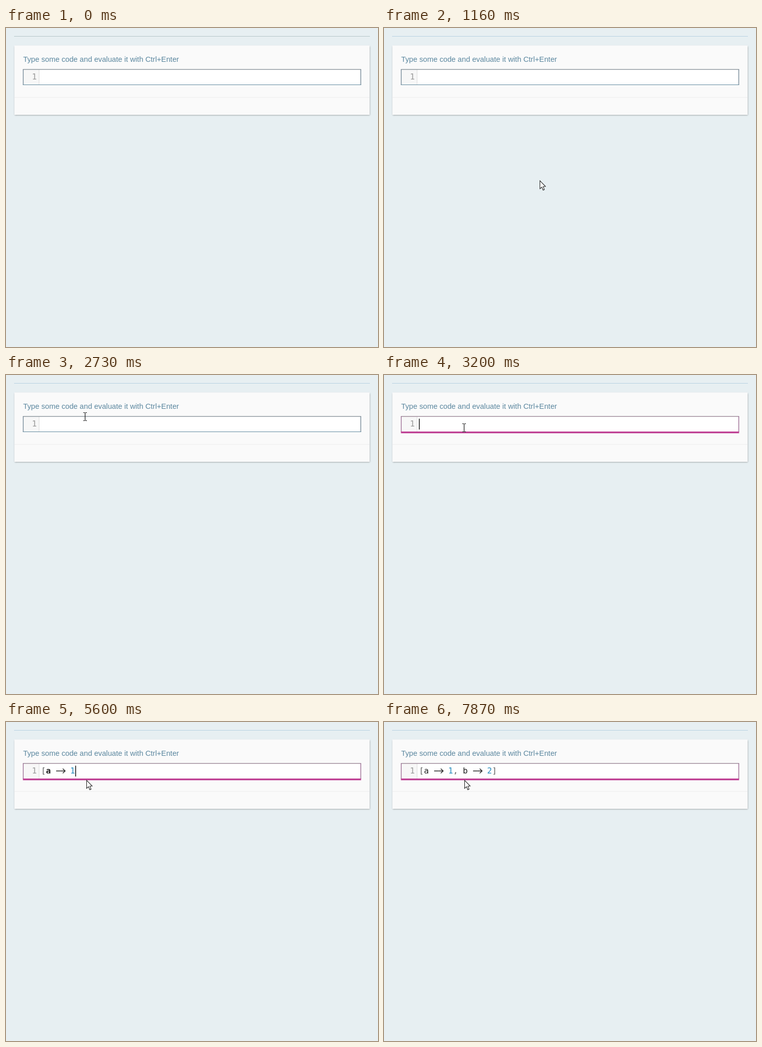
These frames come from a looping animation (736x632 px, 8 s). An HTML page with a canvas:

```html
<!DOCTYPE html>
<html lang="en">
<head>
<meta charset="utf-8">
<title>Code cell</title>
<style>
html, body { margin: 0; width: 100%; height: 100%; overflow: hidden; background: #e7eff2; }
canvas { display: block; width: 736px; height: 632px; }
</style>
</head>
<body>
<canvas id="stage" width="736" height="632"></canvas>
<script>
const ctx = document.getElementById('stage').getContext('2d');
const LOOP = 8000, FOCUS = 3140, BLINK = 530;
const MONO = '16px "DejaVu Sans Mono", monospace';
const X0 = 69.3, STEP = 9.63, BASE = 102;

// Typing comes in short bursts; longer bursts have slower keys.
const bursts = {
  4370: '[', 4800: 'a -', 5300: '> ', 5600: '1, ',
  6070: 'b', 6240: ' -', 6540: '> ', 6800: '2', 7240: ']'
};
const keys = Object.entries(bursts).flatMap(([start, str]) =>
  [...str].map((ch, i) => ({ ch, at: +start + i * 62 * (str.length - 1) })));

const linear = k => k;
const easeOut = k => 1 - (1 - k) ** 3;

// Each pointer move follows a quadratic curve from a over bend to b, then rests.
const moves = [
  { start: 860, end: 1600, hide: 1600, a: [336, 12], bend: [390, 408], b: [12, 608], ease: linear },
  { start: 1870, end: 2070, hide: 2070, a: [118, 128], bend: [128, 70], b: [142, 32], ease: linear },
  { start: 2630, end: 2900, hide: 3400, a: [150, 14], bend: [153.75, 59], b: [157.5, 104], ease: easeOut },
  { start: 3400, end: 3500, hide: LOOP, a: [157.5, 104], bend: [158, 110], b: [159, 115], ease: linear }
];

const clamp = v => Math.max(0, Math.min(1, v));
const mix = (a, b, k) => a + (b - a) * k;
const blend = (a, b, k) => `rgb(${a.map((v, i) => Math.round(mix(v, b[i], k)))})`;

function rect(x, y, w, h, color) {
  ctx.fillStyle = color;
  ctx.fillRect(x, y, w, h);
}

function text(str, x, y, font, color) {
  ctx.font = font;
  ctx.fillStyle = color;
  ctx.fillText(str, x, y);
}

function line(points, color, width) {
  ctx.beginPath();
  points.forEach(([x, y]) => ctx.lineTo(x, y));
  ctx.strokeStyle = color;
  ctx.lineWidth = width;
  ctx.stroke();
}

function drawPanel(t) {
  rect(0, 0, 736, 632, '#e7eff2');
  rect(16, 16, 704, 1, blend([180, 198, 200], [184, 209, 226], clamp((t - 30) / 800)));
  ctx.save();
  ctx.shadowColor = 'rgba(0,0,0,.42)';
  ctx.shadowBlur = 3;
  ctx.shadowOffsetY = 1;
  rect(16.5, 34.5, 703, 137.5, '#fafafa');
  ctx.restore();
  rect(17, 137, 702, 1, '#ededee');
  text('Type some code and evaluate it with Ctrl+Enter', 34, 67,
    '14.7px "Liberation Sans", Arial, sans-serif', '#5b879f');
}

function drawEditor(t) {
  const k = clamp((t - FOCUS) / 60);
  const side = blend([95, 118, 135], [140, 85, 130], k);
  rect(34, 82, 668, 31, '#fff');
  rect(35, 82, 30, 31, '#f7f7f7');
  rect(65, 82, 1, 31, '#ddd');
  rect(33.5, 81.5, 669, 1.2, blend([120, 132, 140], [138, 115, 133], k));
  rect(33.5, 82, 1.2, 31, side);
  rect(701.3, 82, 1.2, 31, side);
  rect(33.5, 112, 669, mix(1, 3.4, k), blend([95, 137, 158], [190, 62, 147], k));
  text('1', 51.3, BASE, MONO, '#999');
}

function drawGlyph(ch, x, bold) {
  if (ch === '-') {
    line([[x + 1, 97], [x + STEP, 97]], '#222', 1.5);
  } else if (ch === '>') {
    line([[x, 97], [x + 9, 97]], '#222', 1.5);
    line([[x + 4.5, 92.5], [x + 9.2, 97], [x + 4.5, 101.5]], '#222', 1.5);
  } else {
    const color = /\d/.test(ch) ? '#268bbd' : /[a-z]/.test(ch) ? '#1e1e1e' : '#606060';
    text(ch, x, BASE, (bold ? 'bold ' : '') + MONO, color);
  }
}

function drawCode(t) {
  const typed = keys.filter(key => key.at <= t);
  typed.forEach(({ ch }, i) => drawGlyph(ch, X0 + i * STEP, ch === 'a' && t < 6300));
  const since = t - (typed.length ? typed[typed.length - 1].at : FOCUS);
  if (since >= 0 && since % (2 * BLINK) < BLINK) {
    rect(Math.round(X0 + typed.length * STEP), 86.5, 1.5, 21.5, '#111');
  }
}

function pointerAt(t) {
  const m = moves.find(({ start, hide }) => t >= start && t < hide);
  if (!m) return null;
  const k = m.ease(clamp((t - m.start) / (m.end - m.start)));
  return m.a.map((v, i) => mix(mix(v, m.bend[i], k), mix(m.bend[i], m.b[i], k), k));
}

function drawBeam() {
  line([[.5, -7], [.5, 8]], '#111', 1.2);
  for (const y of [-7.5, 8.5]) {
    line([[-3, y], [0, y]], '#111', 1);
    line([[1, y], [4, y]], '#111', 1);
  }
}

function drawArrow() {
  ctx.beginPath();
  [[.5, .7], [.5, 16.5], [4.2, 13.2], [6.8, 19.2], [9.3, 18.1], [6.9, 12.3], [11.5, 11.9]]
    .forEach(([x, y]) => ctx.lineTo(x, y));
  ctx.closePath();
  ctx.fillStyle = '#fff';
  ctx.fill();
  ctx.strokeStyle = '#222';
  ctx.lineWidth = 1.1;
  ctx.stroke();
}

function drawPointer(t) {
  const p = pointerAt(t);
  if (!p) return;
  const [x, y] = p;
  const overTitle = x > 33 && x < 330 && y > 54 && y < 73;
  const overEditor = x > 33 && x < 703 && y > 80 && y < 114;
  ctx.save();
  ctx.translate(Math.round(x), Math.round(y));
  if (overTitle || overEditor) drawBeam();
  else drawArrow();
  ctx.restore();
}

const start = performance.now();
function frame() {
  const t = (performance.now() - start) % LOOP;
  drawPanel(t);
  drawEditor(t);
  drawCode(t);
  drawPointer(t);
  requestAnimationFrame(frame);
}
frame();
</script>
</body>
</html>
```
